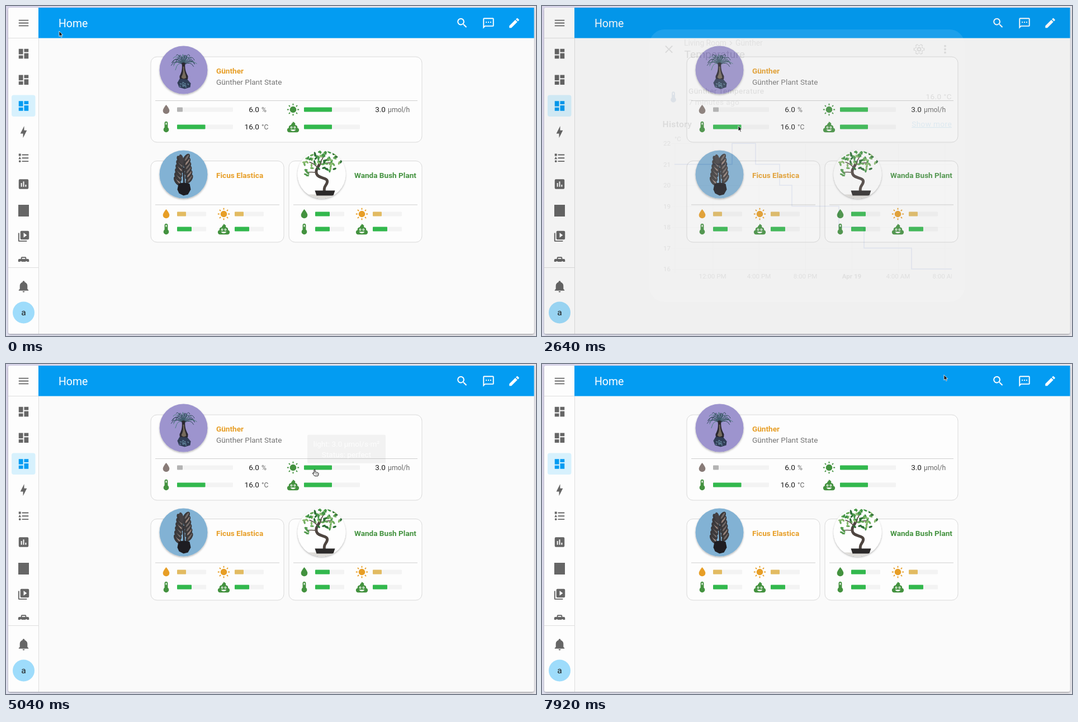
Recreate the animation shown at these times as an HTML page. Size 948x591 px, loop 8 s.

```html
<!DOCTYPE html>
<html lang="en">
<head>
<meta charset="utf-8">
<title>Plant dashboard</title>
<style>
html, body { margin: 0; width: 100%; height: 100%; overflow: hidden; background: #e2e0ec; }
svg { display: block; width: 100vw; height: 100vh; }
text { font-family: Roboto, sans-serif; }
.dialog text { letter-spacing: .4px; }
.dialog .axis text, .dialog .head text { letter-spacing: 0; }
</style>
</head>
<body>
<svg id="stage" viewBox="0 0 948 591"></svg>
<script>
const LOOP = 8000, STEP = 80, CX = 474.5, CY = 295.5;
const GREEN = '#43923f', BAR_GREEN = '#32b84d', AMBER = '#e79e26', BAR_AMBER = '#e2bb62';
const DARK = '#1c1c1c', GREY = '#666', BLUE = '#039cf2', LINK = '#2196dc', STATE = '#3a6a9e';

const dot = (x, y, r) => `M${x - r} ${y}a${r} ${r} 0 1 0 ${2 * r} 0a${r} ${r} 0 1 0 ${-2 * r} 0Z`;
const icons = {
  menu: 'M3 6H21V8H3ZM3 11H21V13H3ZM3 16H21V18H3Z',
  board: 'M13 3V9H21V3ZM13 21H21V11H13ZM3 21H11V15H3ZM3 13H11V3H3Z',
  bolt: 'M11 15H6L13 1V9H18L11 23Z',
  list: 'M5 9.5L7.5 14H2.5ZM3 4H7V8H3ZM9 5V7H21V5ZM9 19H21V17H9ZM9 11V13H21V11Z' + dot(5, 18, 2),
  chart: 'M9 17H7V10H9ZM13 17H11V7H13ZM17 17H15V13H17ZM19 3H5Q3 3 3 5V19Q3 21 5 21H19Q21 21 21 19V5Q21 3 19 3Z',
  media: 'M4 6H2V20Q2 22 4 22H18V20H4ZM20 2H8Q6 2 6 4V16Q6 18 8 18H20Q22 18 22 16V4Q22 2 20 2M12 14.5V5.500L18 10Z',
  toolbox: 'M20 8H17V6Q17 4 15 4H9Q7 4 7 6V8H4Q2 8 2 10V14H6V12H8V14H16V12H18V14H22V10Q22 8 20 8M15 8H9V6H15Z',
  bell: 'M21 19V20H3V19L5 17V11C5 7.900 7 5.200 10 4.300V4A2 2 0 0 1 14 4V4.300C17 5.200 19 7.900 19 11V17ZM14 21A2 2 0 0 1 10 21Z',
  search: 'M9.5 3A6.5 6.5 0 0 1 14.44 13.73L14.71 14H15.5L20.5 19L19 20.5L14 15.5V14.71L13.73 14.44A6.5 6.5 0 1 1 9.5 3Z' + dot(9.5, 9.5, 4.5),
  chat: 'M20 2H4Q2 2 2 4V22L6 18H20Q22 18 22 16V4Q22 2 20 2M20 16H5.170L4 17.170V4H20ZM17 11H15V9H17ZM13 11H11V9H13ZM9 11H7V9H9Z',
  pencil: 'M20.7 7Q21.400 6.300 20.700 5.600L18.400 3.300Q17.700 2.600 17 3.300L15.100 5.100L18.900 8.900ZM3 17.250V21H6.750L17.800 9.900L14.060 6.200Z',
  water: 'M12 20A6 6 0 0 1 6 14C6 10 12 3.250 12 3.250S18 10 18 14A6 6 0 0 1 12 20Z',
  temp: 'M15 13V5A3 3 0 0 0 9 5V13A5 5 0 1 0 15 13M12 4A1 1 0 0 1 13 5V8H11V5A1 1 0 0 1 12 4Z',
  poop: 'M12 2C13 4 16 4 16 6.500Q16 7.500 15.500 8.300C18 8.600 20 10.300 20 12.600L19.800 13.800C21.700 14.300 23 15.800 23 17.600Q22.800 22 18.500 22H5.500Q1.200 22 1 17.600C1 15.800 2.300 14.300 4.200 13.800L4 12.600C4 10.300 6 8.600 8.500 8.300C8.500 5.500 11.500 5.500 12 2ZM7 17H17C16 20.500 8 20.500 7 17Z'
    + dot(9, 13, 2) + dot(15, 13, 2) + dot(9, 13, .9) + dot(15, 13, .9),
  close: 'M19 6.400L17.600 5L12 10.600L6.400 5L5 6.400L10.600 12L5 17.600L6.400 19L12 13.400L17.600 19L19 17.600L13.400 12Z',
  more: dot(12, 6, 2) + dot(12, 12, 2) + dot(12, 18, 2)
};
const polar = (r, deg) => {
  const a = deg * Math.PI / 180;
  return `${(12 + r * Math.cos(a)).toFixed(2)} ${(12 + r * Math.sin(a)).toFixed(2)}`;
};
const turns = (n, f) => Array.from({ length: n }, (_, i) => f(i * 360 / n)).join('');
icons.sun = dot(12, 12, 6) + turns(8, a => `M${polar(8, a - 7)}L${polar(11, a - 5)}L${polar(11, a + 5)}L${polar(8, a + 7)}Z`);
icons.sunRing = icons.sun + dot(12, 12, 4);
const gear = r => 'M' + turns(6, a => `${polar(r, a - 13)} ${polar(r, a + 13)} ${polar(r - 2.6, a + 20)} ${polar(r - 2.6, a + 40)} `) + 'Z';
icons.cog = gear(10.3) + gear(8.5) + dot(12, 12, 4) + dot(12, 12, 2.1);

const icon = (name, x, y, fill) =>
  `<path d="${icons[name]}" fill="${fill}" fill-rule="evenodd" transform="translate(${x} ${y}) scale(.97) translate(-12 -12)"/>`;
const text = (x, cy, s, fill = DARK, size = 13.58, more = '') =>
  `<text x="${x}" y="${cy + size * .355}" font-size="${size}" fill="${fill}" ${more}>${s}</text>`;
const END = 'text-anchor="end"', MID = 'text-anchor="middle"', BOLD = 'font-weight="700"';
const rect = (x, y, w, h, fill, more = '') => `<rect x="${x}" y="${y}" width="${w}" height="${h}" fill="${fill}" ${more}/>`;
const line = (d, stroke, w = 1) => `<path d="${d}" fill="none" stroke="${stroke}" stroke-width="${w}"/>`;
const group = (id, s, more = '') => `<g id="${id}" ${more}>${s}</g>`;

let seed = 7;
const rnd = () => (seed = seed * 16807 % 2147483647) / 2147483647;
const many = (n, f) => Array.from({ length: n }, (_, i) => f(i)).join('');
const leaf = (x, y, rx, ry, a, fill) =>
  `<ellipse cx="${x}" cy="${y}" rx="${rx}" ry="${ry}" fill="${fill}" transform="rotate(${a} ${x} ${y})"/>`;

// Plants are drawn around the middle of their round frame.
const palm = () =>
  many(26, i => {
    const a = Math.PI * (.93 + 1.14 * i / 25), r = 15 + 10 * rnd();
    const x = r * Math.cos(a), y = -13 + .75 * r * Math.sin(a);
    return line(`M0 -9Q${x * .7} ${y - 7} ${x} ${y + 12 * rnd()}`, i % 3 ? '#30495a' : '#4f7d80', 1);
  }) +
  '<path d="M-3 -13H3C2 -2 4 4 8 11Q9 20 0 21Q-8 19 -7 11C-3 4 -2 -2 -3 -13Z" fill="#2a2730"/>' +
  '<path d="M-1 -6H1C1 3 4 8 5 14Q0 18 -4 13C-1 8 0 2 -1 -6Z" fill="#756a5c"/>' +
  '<path d="M-7 16L-11 23L-8 31L2 34L12 31L13 24L7 17Z" fill="#303d56"/>' +
  many(12, () => leaf(-8 + 18 * rnd(), 21 + 10 * rnd(), 1.8, 1, 40 * rnd(), '#5c7c93'));

const ficus = () =>
  line('M1 20L0 -12', '#302d30', 3) +
  many(12, i => {
    const side = i % 2 ? 1 : -1, y = 12 - i * 3.7, x = side * (11 - i * .55);
    return leaf(x, y, 4.8, 9.5, side * 34, '#3b393b') + leaf(x + 1, y - 1, 1.6, 6.5, side * 34, i % 3 ? '#746b68' : '#98847c');
  }) + leaf(-4, -27, 4, 9, -12, '#454144') +
  '<path d="M-9 17Q1 13 11 17L13 27L8 36L0 38L-8 34L-11 27Z" fill="#1e1d22"/>';

const bonsai = () =>
  rect(-30, 36, 60, 10, '#dedcd8') +
  line('M-2 -24C-4 -12 -12 -10 -9 -1C-6 8 12 5 10 14C9 20 3 21 5 31', '#4e4540', 5) +
  line('M-6 -11Q-14 -20 -22 -22M-3 -18Q10 -22 20 -20M-8 -3Q-20 -5 -27 -3M-2 -22L6 -36', '#5a4f48', 1.6) +
  many(64, i => {
    const a = 2 * Math.PI * rnd(), r = Math.sqrt(rnd());
    return leaf(2 + 34 * r * Math.cos(a), -23 + 18 * r * Math.sin(a), 3.4, 1.7, 180 * rnd(), ['#429447', '#6bab5c', '#2f7037', '#8abb70'][i % 4]);
  }) +
  many(6, i => leaf(-30 + 6 * rnd(), -8 + i * 2, 3, 1.6, 60 * rnd(), '#559b50')) +
  '<path d="M-12 29H24L21 38H-9Z" fill="#2c2a2a"/>';

const portrait = (x, y, fill, plant) =>
  `<g transform="translate(${x} ${y})"><circle r="43" fill="${fill}" filter="url(#shadow)"/><g clip-path="url(#round)">${plant}</g></g>`;
const card = (x, y, w, h) =>
  rect(x, y, w, h, '#fdfdfd', 'rx="11" stroke="#d9d9d9"') + line(`M${x + 8} ${y + 78.500}H${x + w - 8}`, '#cfcfcf');
const meter = (name, x, y, w, used, tint, bar) =>
  icon(name, x, y, tint) + rect(x + 19.5, y - 4, w, 8, '#f3f3f3', 'rx="1"') + rect(x + 19.5, y - 4, used, 8, bar, 'rx="1"');
const reading = (x, y, value, unit) => text(x, y, value, DARK, 13.58, END) + text(x + 4, y, unit, '#666', 12.2);
const smallMeters = (x, tint, bar) =>
  meter('water', x, 372.5, 52, bar === BAR_GREEN ? 26 : 16, tint, bar) +
  meter('sun', x + 103, 372.5, 52, 16, AMBER, BAR_AMBER) +
  meter('temp', x, 399.5, 52, 26, GREEN, BAR_GREEN) +
  meter('poop', x + 103, 399.5, 52, 26, GREEN, BAR_GREEN);

const page =
  rect(4, 3, 940.5, 584, '#fafafa', 'rx="4" filter="url(#shadow)"') +
  rect(4, 3, 54, 584, '#fdfdfd', 'rx="4"') + rect(58, 3, 886.500, 54.500, BLUE) +
  line('M58.500 58V587M4 57.500H58M4 468.500H58', '#dedede') +
  rect(10, 159.5, 42.5, 38.5, '#d7f1fd', 'rx="4"') +
  icon('menu', 31.5, 30.5, GREY) +
  ['board', 'board', 'board', 'bolt', 'list', 'chart', '', 'media'].map((n, i) =>
    n ? icon(n, 31.5, 85.5 + i * 46.7, i === 2 ? BLUE : GREY) : rect(22, 356, 19, 21, GREY)).join('') +
  `<g clip-path="url(#nav)">${icon('toolbox', 31.5, 457, GREY)}</g>` +
  icon('bell', 31.5, 502, GREY) +
  '<circle cx="31.500" cy="549" r="19.500" fill="#9edcfb"/>' + text(31.5, 548, 'a', DARK, 15.5, MID) +
  text(94, 31, 'Home', '#fff', 19.4) +
  icon('search', 816, 30.5, '#fff') + icon('chat', 863, 31, '#fff') + icon('pencil', 909, 30.5, '#fff') +
  card(259, 91, 485, 153) + card(259, 277.5, 238, 145.5) + card(506, 277.5, 238, 145.5) +
  portrait(317.5, 114.5, '#9d94ce', palm()) +
  portrait(317.5, 301.5, '#82b2d4', ficus()) +
  portrait(564.5, 301.5, '#fefefe', bonsai()) +
  text(376, 116.5, 'Günther', AMBER, 13.58, BOLD) + text(376, 136, 'Günther Plant State', '#757575') +
  text(376, 303, 'Ficus Elastica', AMBER, 13.58, BOLD) + text(623, 303, 'Wanda Bush Plant', GREEN, 13.58, BOLD) +
  meter('water', 286.5, 185.5, 100, 10, '#887b77', '#b3b3b3') + reading(453, 185.5, '6.0', '%') +
  meter('temp', 286.5, 216.5, 100, 50.5, GREEN, BAR_GREEN) + reading(453, 216.5, '16.0', '°C') +
  meter('sun', 513.5, 185.5, 100, 50, GREEN, BAR_GREEN) + reading(679, 185.5, '3.0', 'μmol/h') +
  meter('poop', 513.5, 216.5, 100, 50, GREEN, BAR_GREEN) +
  smallMeters(286.5, AMBER, BAR_AMBER) + smallMeters(533.5, GREEN, BAR_GREEN);

const link = y => text(733, y, 'Show more', LINK, 13.58, END + ' text-decoration="underline"');
const hours = (x, step, y, fill) => ['12:00 PM', '4:00 PM', '8:00 PM', 'Apr 19', '4:00 AM', '8:00 AM']
  .map((s, i) => text(x + i * step, y, s, fill, 11.6, MID + (i === 3 ? ' ' + BOLD : ''))).join('');
const axis = s => `<g class="axis" clip-path="url(#plot)">${s}</g>`;

// steps: pairs of [x where the level begins, level]
const chart = (unit, low, gap, steps) => {
  const y = v => 471 - (v - low) / gap * 37.5;
  return axis(
    many(7, i => line(`M232 ${471.5 - i * 37.5}H733`, '#e3e3e3') + text(230, 471 - i * 37.5, low + i * gap, '#555', 11.6, END)) +
    many(6, i => line(`M${305.5 + i * 83} 246V478`, '#e3e3e3')) + line('M237.500 246V478', '#e3e3e3') +
    text(237, 238, unit, '#555', 11.6) + hours(305, 83, 484, '#555') +
    line(`M237 ${y(steps[0][1])}` + steps.map(([x, v]) => `H${x}V${y(v)}`).join('') + 'H733', '#4269d0', 1.5));
};
const bars = axis(rect(215.5, 242.5, 517, 18.5, '#efbd4f') + text(219.5, 251.5, 'Perfect', DARK, 11.6) + hours(287, 86.1, 275, '#222')) +
  text(215.5, 319.5, 'Logbook', DARK, 15.5, 'font-weight="500"') + link(320) +
  text(474, 367.5, 'No logbook events found.', '#555', 13.58, MID) +
  rect(215.5, 409.5, 517, 47, 'none', 'rx="12" stroke="#dcdcdc"') +
  text(224, 433, 'Attributes', DARK, 13.58, 'font-weight="500"') + line('M707 430L712 435L717 430', DARK, 2);

const dialogs = [
  { name: 'Temperature', glyph: 'temp', value: '16.0 °C', open: 1200, shut: 2640, loaded: 1920, lead: 28, left: .1, tall: 488,
    body: chart('°C', 16, 1, [[237, 21], [340, 22], [382, 21], [425, 20], [447, 19], [531, 18], [576, 17], [661, 16]]) },
  { name: 'Light', glyph: 'sunRing', value: '3.0 μmol/s·m²', open: 3840, shut: 5040, loaded: 3920, lead: 28, left: 0, tall: 488,
    body: chart('μmol/s·m²', 0, 5, [[237, 9], [290, 14], [338, 22], [384, 12], [430, 5], [482, 0], [655, 1], [700, 3]]) },
  { name: 'Nutrients state', glyph: 'poop', value: 'Perfect', open: 5840, shut: 6880, loaded: 5840, lead: 41, left: .5, tall: 438.5, body: bars }
];
const dialog = (d, i) => group('dialog' + i,
  rect(192, 42, 564, 287, '#fdfdfd', `id="sheet${i}" rx="27"`) +
  `<g class="head">${icon('close', 227, 77.5, DARK)}${text(254, 66, 'Living Room', '#666', 13.8)}${line('M336 63L339.500 66.500L336 70', '#666', 1.4)}` +
  `${text(346, 66, 'Günther', '#666', 13.8)}${text(254.5, 86.5, d.name, DARK, 19.2)}</g>` +
  icon('cog', 674.5, 77.5, DARK) + icon('more', 721, 77.5, DARK) +
  icon(d.glyph, 235, 163, STATE) + text(262, 152.5, 'Günther ' + d.name) + text(262, 172, '7 minutes ago', '#666') +
  text(733, 162, d.value, DARK, 13.58, END) +
  text(215.5, 211, 'History', DARK, 15.5, 'font-weight="500"') + link(211) +
  group('wait' + i, text(474, 261.5, 'Loading state history…', '#666', 13.58, MID)) + group('body' + i, d.body), 'class="dialog"');

// spans: [fade-in start, leave start]; a dialog opening cuts the tip off at once
const tips = [
  { x: 382, y: 158, w: 148, s: 'temperature: 16.0 °C', spans: [[680, 1200], [2680, 2960]] },
  { x: 609, y: 127, w: 140, s: 'light: 3.0 μmol/s·m²', spans: [[3320, 3840], [5024, 5200]] },
  { x: 609, y: 158, w: 132, s: 'nutrients: Perfect', spans: [[5320, 5840], [6920, 7440]] }
];
const tip = (p, i) => group('tip' + i, rect(p.x - p.w / 2, p.y, p.w, 51, '#808080', 'rx="2"') +
  text(p.x, p.y + 16, p.s, '#fff', 13.58, MID) + text(p.x, p.y + 35.5, 'Status: perfect', '#fff', 13.58, MID));

const cursor = group('arrow', '<path d="M0 0V9.500L2.200 7.500L3.800 11L5.300 10.400L3.800 7H6.700Z" fill="#111" stroke="#fff" stroke-width=".8"/>') +
  group('hand', '<path d="M-1 0Q0 -1.500 1 0V4L6 5Q7.500 5.500 7 8L6 11H0L-3.500 6.500Q-3.500 5 -2 5.500L-1 6.500Z" fill="#fff" stroke="#111"/>' + line('M1.500 6V8M3.500 6.500V8.500M5.300 6.700V8.500', '#111', .7));

const $ = id => document.getElementById(id);
$('stage').innerHTML = `<defs>
  <filter id="shadow" x="-20%" y="-20%" width="140%" height="140%"><feDropShadow dx="0" dy="1.500" stdDeviation="1.500" flood-opacity=".3"/></filter>
  <clipPath id="round"><circle r="43"/></clipPath>
  <clipPath id="nav"><rect x="4" y="430" width="54" height="28"/></clipPath>
  <clipPath id="plot"><rect x="200" y="225" width="533" height="300"/></clipPath>
  <linearGradient id="desk" x2="1" y2=".3"><stop stop-color="#d9d5ea"/><stop offset=".3" stop-color="#dfe0ee"/><stop offset="1" stop-color="#e6e5ea"/></linearGradient>
</defs>` + rect(0, 0, 948, 591, 'url(#desk)') + page + tips.map(tip).join('') +
  rect(4, 3, 940.5, 584, '#000', 'id="scrim" rx="4"') + dialogs.map(dialog).join('') + group('cursor', cursor);

const clamp = v => Math.max(0, Math.min(1, v));
const smooth = v => v * v * (3 - 2 * v);
const show = (id, on) => $(id).style.display = on ? '' : 'none';

// [start, end, x, y]: each move begins where the last one ended
const moves = [[80, 720, 351, 214.5], [2880, 3360, 552, 189.5], [5200, 5440, 553, 216], [7360, 7920, 719, 19.5]];
const pointer = t => moves.reduce(([x, y], [a, b, nx, ny]) => {
  const k = smooth(clamp((t - a) / (b - a)));
  return [x + (nx - x) * k, y + (ny - y) * k];
}, [95, 45]);

function draw(t) {
  let dim = 0;
  dialogs.forEach((d, i) => {
    const p = clamp((t - d.open + d.lead) / 150), closing = t >= d.shut;
    const on = t >= d.open && t < d.shut + STEP && !(closing && !d.left);
    show('dialog' + i, on);
    if (!on) return;
    const scale = .8 + .2 * (1 - (1 - p) ** 3.6), loaded = t >= d.loaded;
    dim = closing ? d.left * .4 : .36 * p;
    $('dialog' + i).setAttribute('opacity', closing ? d.left : clamp(p * 2));
    $('dialog' + i).setAttribute('transform', `translate(${CX} ${CY}) scale(${scale}) translate(${-CX} ${-CY})`);
    $('sheet' + i).setAttribute('height', loaded ? d.tall : 287);
    show('wait' + i, !loaded);
    show('body' + i, loaded);
  });
  $('scrim').setAttribute('opacity', dim);

  tips.forEach((p, i) => {
    const k = Math.max(...p.spans.map(([a, b]) => {
      const cut = dialogs.some(d => d.open === b) && t >= b;
      return cut ? 0 : clamp((t - a) / 200) * clamp(1 - (t - b) / 160);
    }));
    $('tip' + i).setAttribute('opacity', k);
    $('tip' + i).setAttribute('transform', `translate(0 ${-10 * smooth(k)})`);
  });

  const [x, y] = pointer(t);
  const hover = tips.some(p => p.spans.some(([a, b]) => t >= a && t < b));
  $('cursor').setAttribute('transform', `translate(${x} ${y})`);
  show('hand', hover);
  show('arrow', !hover);
}

const begin = performance.now();
(function tick() {
  draw(Math.floor((performance.now() - begin) % LOOP / STEP) * STEP);
  requestAnimationFrame(tick);
})();
</script>
</body>
</html>
```
